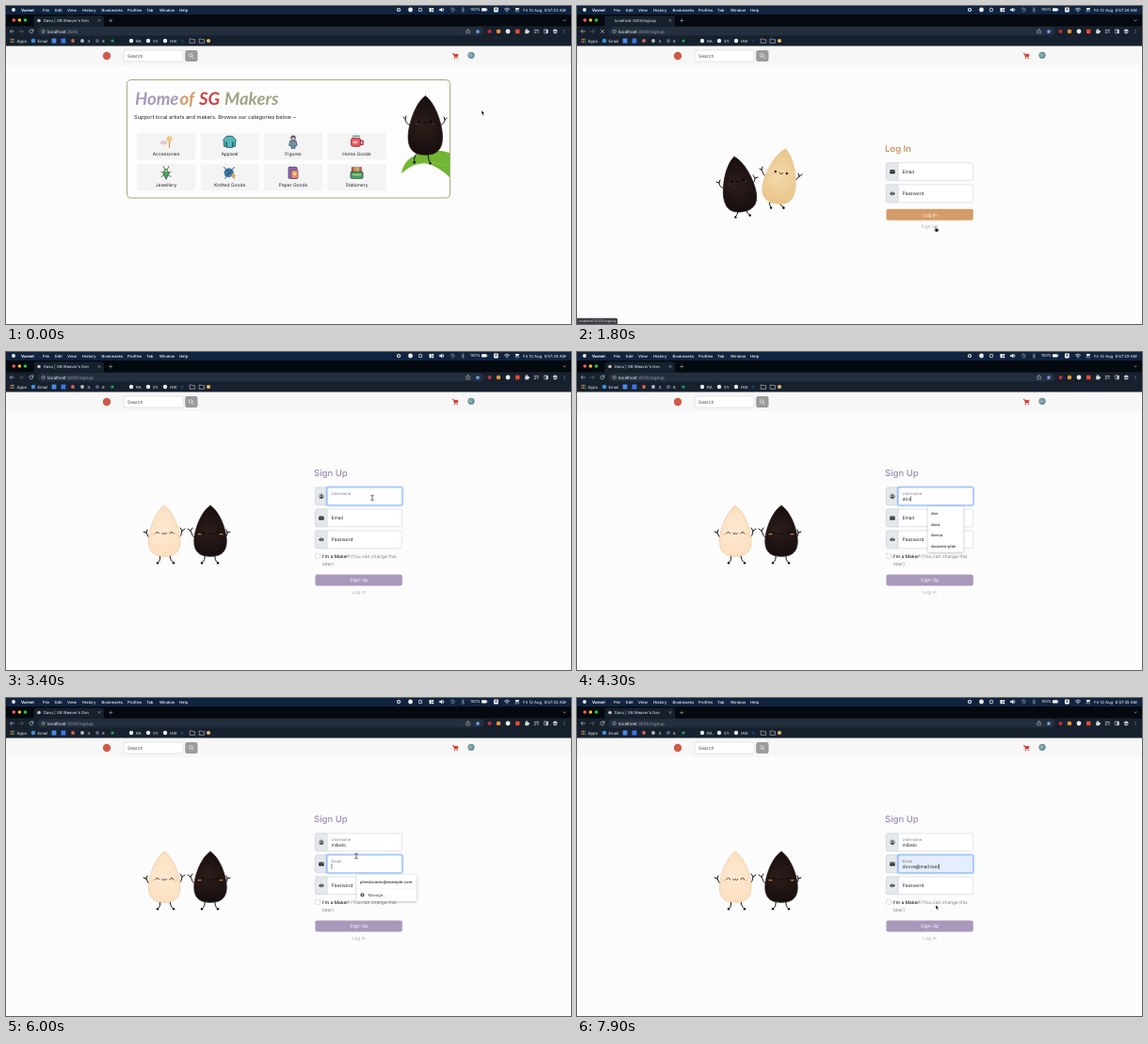
An HTML page with a canvas for the animation above (8000 ms loop, 600 by 338 pixels).

```html
<!DOCTYPE html>
<html lang="en">
<head>
<meta charset="utf-8">
<title>Shop sign up</title>
<style>
html, body { margin: 0; width: 100%; height: 100%; overflow: hidden; background: #fcfcfd; }
canvas { display: block; width: 600px; height: 338px; }
</style>
</head>
<body>
<canvas id="stage"></canvas>
<script>
const canvas = document.getElementById('stage');
const ctx = canvas.getContext('2d');
const ratio = window.devicePixelRatio || 1;
canvas.width = 600 * ratio;
canvas.height = 338 * ratio;
ctx.textRendering = 'geometricPrecision';

const LOOP = 8000, STEP = 100;
const SITE = 'Davu', TITLE = SITE + " | OB Weaver's Den";
const TAN = '#d49c68', PURPLE = '#a898bb', INK = '#212529', LINE = '#ced4da';

// Drawing helpers
function box(x, y, w, h, r, fill, stroke, width = 0.6) {
  ctx.beginPath();
  ctx.roundRect(x, y, w, h, r);
  if (fill) { ctx.fillStyle = fill; ctx.fill(); }
  if (stroke) { ctx.strokeStyle = stroke; ctx.lineWidth = width; ctx.stroke(); }
}
function dot(x, y, r, fill) {
  ctx.beginPath();
  ctx.arc(x, y, r, 0, Math.PI * 2);
  ctx.fillStyle = fill;
  ctx.fill();
}
function path(d, fill, stroke, width = 0.7) {
  const p = new Path2D(d);
  if (fill) { ctx.fillStyle = fill; ctx.fill(p); }
  if (stroke) {
    ctx.strokeStyle = stroke; ctx.lineWidth = width;
    ctx.lineCap = ctx.lineJoin = 'round';
    ctx.stroke(p);
  }
}
function text(s, x, y, size, color, weight = 400, align = 'left', family = 'Inter') {
  ctx.font = `${weight} ${size}px ${family}, sans-serif`;
  ctx.textAlign = align;
  ctx.textBaseline = 'alphabetic';
  ctx.fillStyle = color;
  ctx.fillText(s, x, y + size * 0.36);
  return ctx.measureText(s).width;
}
function at(x, y, draw, turn = 0) {
  ctx.save();
  ctx.translate(x, y);
  ctx.rotate(turn);
  draw();
  ctx.restore();
}
const latest = (events, t) => events.reduce((now, e) => e[0] <= t ? e : now, events[0]);

// Timeline
const mouse = [[0, 505, 111], [300, 494, 53], [800, 494, 54], [1100, 448, 209], [1500, 381, 235],
  [1900, 381, 235], [2500, 391, 162], [2800, 389, 155], [3700, 389, 155],
  [5300, 389, 155], [5600, 372, 168], [6600, 372, 168], [7700, 379, 204], [7900, 381, 220]];
const userTyping = [[0, ''], [3800, 'd'], [4000, 'do'], [4200, 'dov'], [4500, ''], [4700, 'm'],
  [4800, 'mi'], [5000, 'mib'], [5100, 'mibe'], [5200, 'mibel'], [5300, 'mibelo']];
const mailTyping = [[0, ''], [6600, 'd'], [6900, 'do'], [7000, 'dov'], [7100, 'dovv'],
  [7200, 'dovva'], [7700, 'dovva@mail.test']];

function mouseAt(t) {
  const i = Math.max(1, mouse.findIndex(k => k[0] >= t));
  const [t0, x0, y0] = mouse[i - 1], [t1, x1, y1] = mouse[i];
  const u = (t - t0) / (t1 - t0), e = u * u * (3 - 2 * u);
  return [x0 + (x1 - x0) * e, y0 + (y1 - y0) * e];
}

// Browser window
function menuBar(t) {
  box(0, 0, 600, 9, 0, '#10243f');
  dot(8, 4, 1.9, '#f1f3f5');
  text('Vornel', 16, 4, 4.3, '#fff', 700);
  [['File', 39], ['Edit', 52], ['View', 65], ['History', 81], ['Bookmarks', 101.5], ['Profiles', 129],
    ['Tab', 149], ['Window', 163], ['Help', 184]].forEach(([s, x]) => text(s, x, 4, 4.2, '#f1f3f5', 500));
  dot(417, 4, 2.1, '#e9edf2'); dot(417, 4, 1, '#10243f');
  dot(429.5, 4, 2.4, '#e9edf2');
  dot(440, 4, 2.2, '#bcc5d0'); dot(440, 4, 1.3, '#10243f');
  box(449.5, 2, 2.2, 4.2, 0.4, '#fff'); box(452.2, 2, 2, 1.8, 0.3, '#fff'); box(452.2, 4.4, 2, 1.8, 0.3, '#fff');
  path('M460.5 3.2h1.2l1.5-1.2v4l-1.5-1.2h-1.2zM464.5 2.5q1.5 1.5 0 3', '#fff', '#fff', 0.4);
  path('M472.3 4a2 2 0 1 1 .8 1.6M474.2 2.8v1.3l.9.5', null, '#aeb8c5', 0.5);
  path('M483.8 2.7l2.8 2.7-1.4 1.2v-5l1.4 1.2-2.8 2.7', null, '#b8c2ce', 0.45);
  text('100%', 493, 4, 4.1, '#fff');
  box(505, 2.3, 5.5, 3.3, 0.8, '#fff'); box(510.9, 3.3, 0.5, 1.3, 0.2, '#fff');
  box(518, 1.6, 4.8, 4.8, 0.8, '#fff'); text('A', 520.4, 4, 4, '#10243f', 600, 'center');
  path('M529.4 3.2q2.6-2.4 5.2 0M530.6 4.4q1.4-1.3 2.8 0', null, '#fff', 0.7); dot(532, 5.8, 0.6, '#fff');
  box(540.8, 1.9, 4.2, 1.8, 0.9, '#fff'); box(541, 4.4, 3.8, 1.6, 0.8, null, '#fff', 0.4);
  const second = Math.floor(23.45 + t * 0.0015);
  text(`Fri 12 Aug  8:57:${second} AM`, 594.5, 4, 4.25, '#fff', 400, 'right');
}

function browser(t, route, loading) {
  box(0, 8.5, 600, 14, 0, '#04090f');
  ['#ff5f57', '#febc2e', '#28c840'].forEach((c, i) => dot(8.3 + i * 6.1, 15, 1.8, c));
  const bar = '#17212e', icon = '#d4d9df';
  box(29.5, 10.5, 74.5, 13, [3, 3, 0, 0], bar);
  if (!loading) dot(35, 15.5, 1.8, '#c9c4bd');
  text(loading ? 'localhost:3000' + route : TITLE, 40, 15.5, 4.15, '#eef0f2');
  path('M98 14.4l2 2m0-2l-2 2M109.5 15.5h3.4m-1.7-1.7v3.4', null, icon, 0.45);
  path('M591.7 14.7l1.4 1.4 1.4-1.4', null, icon, 0.5);

  box(0, 21.5, 600, 21, 0, bar);
  box(33.5, 22.3, 474, 9, 4.5, '#242f3d');
  path('M8.5 27H4.4m1.7-1.8L4.3 27l1.8 1.8', null, icon, 0.6);
  path('M14 27h4.1m-1.7-1.8l1.8 1.8-1.8 1.8', null, '#68717c', 0.6);
  path(loading ? 'M25.4 25.4l3.2 3.2m0-3.2l-3.2 3.2' : 'M28.7 26a2 2 0 1 0 .1 1.7M29 24.7v1.6h-1.6', null, icon, 0.6);
  path('M41.4 27a1.8 1.8 0 1 1-3.6 0a1.8 1.8 0 1 1 3.6 0M39.6 26.9v.9M39.6 26v.1', null, icon, 0.4);
  const w = text('localhost', 44, 27, 4.6, '#fff');
  text(':3000' + route, 44 + w, 27, 4.6, '#9aa2ac');
  path('M489.5 26h-.9v3h4v-3h-.9M490.6 28v-3.6m-1 1l1-1 1 1', null, icon, 0.4);
  path('M501 24.6l.8 1.6 1.7.2-1.3 1.2.4 1.7-1.6-.9-1.6.9.4-1.7-1.3-1.2 1.7-.2z', '#78a9f7');
  dot(513.5, 27, 2, '#c62e32'); dot(523, 27, 2.3, '#e79433'); dot(533, 27, 2.4, '#e9edf1');
  box(541, 24.7, 4.5, 4.5, 0.7, '#e64b31');
  box(551.2, 25.4, 3.8, 3.8, 0.5, icon); dot(553, 25.1, 0.9, icon); dot(555.2, 27.2, 0.9, icon);
  path('M561.2 25.4h4m-4 1.6h2m-2 1.6h1.5M565 25.6v3', null, icon, 0.6);
  box(571.4, 25, 4, 4, 0.5, null, icon, 0.5); box(573.5, 25, 2, 4, 0, icon);
  dot(583.2, 27, 2.4, '#bec5cd'); box(581, 27, 4.4, 1.1, 0.2, '#4c5663');
  [25.4, 27, 28.6].forEach(y => dot(593, y, 0.45, icon));

  for (let i = 0; i < 9; i++)
    box(4.5 + i % 3 * 1.6, 34.8 + Math.floor(i / 3) * 1.6, 1.1, 1.1, 0.2, ['#e26150', '#e2b540', '#58a869'][i % 3]);
  text('Apps', 11.5, 37, 4.3, '#e8eaed');
  dot(29, 37, 2.3, '#3f8dda');
  text('Email', 33.5, 37, 4.3, '#e8eaed');
  box(48.6, 34.6, 4.8, 4.8, 0.7, '#4d89ea'); box(58.5, 34.6, 4.8, 4.8, 0.5, '#3c77e7');
  dot(71, 37, 1.9, '#d7645a'); dot(81, 37, 1.9, '#b9c0c8');
  text(':3', 85.5, 37, 4.3, '#e8eaed');
  dot(97, 37, 2, '#526575'); text('8', 102, 37, 4.3, '#e8eaed');
  dot(113, 37, 1.6, '#1fa65a');
  [['RA', 133], ['SY', 151], ['HW', 169]].forEach(([s, x]) => {
    dot(x, 37, 2.2, '#e8edf2'); text(s, x + 5, 37, 4.3, '#e8eaed');
  });
  dot(187, 37, 1.8, '#183a61');
  [195.5, 205.5].forEach(x => path(`M${x} 35h2l.6.7h2.5v3.6h-5.1z`, null, icon, 0.55));
  dot(215, 37, 2.1, '#e5b96a');
}

function navBar() {
  box(0, 42, 600, 296, 0, '#fcfcfd');
  box(0, 42, 600, 21, 0, '#f7f7f7');
  dot(107, 53, 4.2, '#d05a48');
  box(125, 47, 63, 12, 2, '#fff', LINE);
  text('Search', 129, 53, 4.95, '#444a50');
  box(190.2, 47, 13.3, 12, 2, '#9b9b9b');
  path('M198 52.4a1.8 1.8 0 1 1-3.6 0a1.8 1.8 0 1 1 3.6 0M197.6 53.8l1.7 1.8', null, '#fff', 0.6);
  path('M474.3 50.4h1l.8 3.7h3.3l.7-2.8h-4.4z', '#d33a2e', '#d33a2e', 0.6);
  dot(476.4, 55.5, 0.7, '#d33a2e'); dot(479.2, 55.5, 0.7, '#d33a2e');
  dot(494, 52.3, 3.6, '#688e93'); dot(493.4, 52, 2.2, '#86b0af');
}

// Seed mascots
function seed(x, y, w, h, turn, dark, face) {
  at(x, y, () => {
    const a = w / 2, b = h / 2;
    const shade = ctx.createRadialGradient(-a * 0.2, 0, 1, 0, 0, b);
    shade.addColorStop(0, dark ? '#2c1d1b' : face === 'happy' ? '#fee8d0' : '#f3d9aa');
    shade.addColorStop(1, dark ? '#160e0e' : face === 'happy' ? '#fbdfc0' : '#e8c487');
    path(`M0 ${-b}C${a * 0.55} ${-b * 0.8} ${a} ${-b * 0.05} ${a} ${b * 0.4}C${a} ${b * 0.9} ${a * 0.5} ${b} 0 ${b}` +
      `C${-a * 0.5} ${b} ${-a} ${b * 0.9} ${-a} ${b * 0.4}C${-a} ${-b * 0.05} ${-a * 0.55} ${-b * 0.8} 0 ${-b}Z`,
      shade, dark ? '#2b1d1b' : '#ebc795', 0.7);
    const ink = dark ? '#050303' : '#261b18';
    if (face === 'happy') {
      path('M-9.6 2.6q2-3.4 4 0M5.6 2.6q2-3.4 4 0M-2.6 2.2q1.3 2.4 2.6 0q1.3 2.4 2.6 0', null, ink, 0.8);
      [-11.5, 11.5].forEach(c => box(c - 2, 2.8, 4, 1.2, 0.6, dark ? '#ce7b4d' : '#f7c49d'));
    } else {
      dot(-6.5, -4, 1.2, ink); dot(5.7, -4, 1.2, ink);
      path('M-2.2-3.4q1.8 2.3 3.6 0', null, ink, 0.9);
      [-9, 8.4].forEach(c => box(c - 1.5, -2.2, 3, 1.1, 0.5, dark ? '#51302b' : '#edb47f'));
    }
  }, turn);
}
const limbs = d => path(d, null, '#191211', 1);
const hands = points => points.forEach(([x, y]) => dot(x, y, 1.2, '#191211'));

// Pages
const categories = [
  ['Accessories', () => { box(-6, -1, 7, 4, 2, '#dfc9cc'); dot(3.5, -3, 3, '#f0c980'); path('M3.5 0v6', null, '#d39b62', 1.2); }],
  ['Apparel', () => path('M-3-6h6l3.5 4-.7 7h-2.5v-5v6h-6.6v-6v5h-2.5l-.7-7z', '#53b9b7', '#26536a', 0.9)],
  ['Figures', () => { path('M-3-1h6l1 5h-2v3h-4v-3h-2z', '#7191a8', '#374a62', 0.8); dot(0, -4, 2.7, '#465267'); dot(0, -3.4, 1.7, '#e6b39a'); }],
  ['Home Goods', () => { path('M3.5-1h3v4h-3', null, '#b8384b', 1.5); box(-6, -4, 10, 9, 2, '#ea5260', '#823345', 0.8); box(-4, -1, 5, 3, 1, '#f4b9ac'); path('M-4-6h7', null, '#69a4a5', 1.5); }],
  ['Jewellery', () => { path('M-3-7l2 4m4-4l-2 4M-5-1l10 5M5-1l-10 5', null, '#35543b', 0.8); path('M0-4l3 4-3 7-3-7z', '#49a660', '#274b36', 0.8); dot(0, -2, 1.4, '#95d074'); }],
  ['Knitted Goods', () => { dot(-1, 0, 5, '#3f88b7'); path('M-5 0q4-5 7-3M-4 3q5-6 8-4M-6-6L5 6M5-6L-5 6', null, '#274a72', 0.9); dot(4, 3, 2, '#e4aa43'); }],
  ['Paper Goods', () => { box(-5, -6, 9, 12, 1, '#8b6bb0', '#4a3b70', 0.8); box(-2, -3, 7, 9, 0.8, '#eb8f79', '#724057', 0.7); dot(1.5, 1, 1.7, '#f5d57d'); }],
  ['Stationery', () => { ['#d94b45', '#efaa43', '#efcf50', '#d95553'].forEach((c, i) => box(-5.5 + i * 2.8, -6, 2.3, 7, 0.7, c, '#59433c', 0.4)); box(-6.5, -1, 13, 7, 1, '#4ca264', '#284e3f', 0.8); path('M-4 2h8', null, '#d6e5a1', 1); }]
];

function homePage() {
  box(128.5, 78.5, 343, 125.5, 4, '#fdfdfd', '#9fac80', 1);
  [['Home', 137, PURPLE], ['of', 184.5, TAN], ['SG', 205, '#c64541'], ['Makers', 232, '#9ba681']]
    .forEach(([s, x, c]) => text(s, x, 98, 18.5, c, 'italic 700', 'left', 'Lato'));
  text('Support local artists and makers. Browse our categories below ~', 136, 118, 5.65, INK);
  categories.forEach(([label, draw], i) => {
    const x = 139 + i % 4 * 67.5, y = i < 4 ? 135 : 168;
    box(x, y, 62.3, 28.3, 2, '#f4f4f5');
    at(x + 31, y + 9.3, draw);
    text(label, x + 31, y + 21.8, 4.95, INK, 400, 'center');
  });
  path('M420 178Q422 164 436 158Q455 150 471 156V182Q463 174 452 169Q437 163 420 178Z', '#72b532');
  path('M421 177Q436 160 471 170', null, '#93c95a', 0.7);
  limbs('M430 127Q424 125 424 120l-2-2m2 2l1-3M460 127Q466 125 466 121l2-2m-2 2l-1-3M437 156Q432 161 434 166M448 156Q448 164 451 167');
  hands([[433.6, 166.3], [450.5, 167.3]]);
  seed(445.3, 127, 36.5, 62.5, 0, true, 'calm');
}

function field(y, label, glyph, value, focused, caret, fill = '#fff') {
  box(328.4, y, 92.2, 18.7, 2, fill, LINE);
  box(328.4, y, 12.8, 18.7, [2, 0, 0, 2], '#e4e8ec', LINE);
  const m = y + 9.4;
  if (glyph === 'mail') {
    box(332.2, m - 2, 5.4, 4.2, 0.7, INK); path(`M332.7 ${m - 1.2}l2.2 1.5 2.2-1.5`, null, '#e4e8ec', 0.5);
  } else if (glyph === 'eye') {
    path(`M332 ${m}q2.9-3.6 5.8 0q-2.9 3.6-5.8 0`, INK); dot(334.9, m, 1.2, '#e4e8ec'); dot(334.9, m, 0.7, INK);
  } else {
    path(`M337.3 ${m}a2.4 2.4 0 1 1-4.8 0a2.4 2.4 0 1 1 4.8 0`, null, INK, 0.5);
    dot(334.9, m - 0.7, 0.9, INK); path(`M333.3 ${m + 1.5}q1.6-2.2 3.2 0z`, INK, INK, 0.3);
  }
  if (focused) {
    box(340.7, y - 0.4, 80.4, 19.5, 2, null, 'rgba(13,110,253,.25)', 2.2);
    box(341.2, y, 79.4, 18.7, 1, fill, '#86b7fe', 0.7);
  }
  if (!focused && !value) return text(label, 345.5, m, 4.95, INK);
  text(label, 345.5, y + 6.1, 4.25, '#777d83');
  const w = text(value, 345.5, y + 12.1, 4.95, INK);
  if (caret) box(345.7 + w, y + 9.3, 0.5, 5.4, 0, '#111');
}
function button(label, y, color) {
  box(328.4, y, 92.4, 12, 2, color);
  text(label, 374.6, y + 6, 5.1, '#fff', 400, 'center');
}
const blink = (t, since) => (t - since) % 700 < 350;

function loginPage(t) {
  limbs('M157 194Q151 193 151 188l-3-1m3 1l1-3M184 190Q189 188 189 183l3-1m-3 1l-2-3M170 216Q172 222 168 224M180 216Q180 221 184 222');
  limbs('M201 182Q198 180 196 174l-2-1m2 1l1-3M229 186Q233 186 236 181l3-2m-3 2l-1-3M205 207Q203 211 206 214M216 208Q215 213 220 214');
  hands([[168.4, 224.6], [183.6, 222.6], [206, 214.6], [219.4, 214.8]]);
  seed(171.3, 189.5, 35, 59, -0.15, true, 'calm');
  seed(216.5, 181, 35, 59, 0.17, false, 'calm');
  text('Log In', 327, 151.3, 9.5, '#cd995f', 600);
  const focused = t < 1600;
  field(190, 'Password', 'eye', '');
  field(166.6, 'Email', 'mail', '', focused, focused && blink(t, 700));
  button('Log In', 215.7, TAN);
  text('Sign Up', 374.5, 234, 4.95, '#a9a9ad', 400, 'center');
}

function popup(x, y, w, h) {
  ctx.save();
  ctx.shadowColor = 'rgba(0,0,0,.28)';
  ctx.shadowBlur = 3 * ratio;
  ctx.shadowOffsetY = ratio * 0.7;
  box(x, y, w, h, 1, '#fff');
  ctx.restore();
}

function signupPage(t) {
  limbs('M154 198Q150 197 149 192l-3-1m3 1l1-3M183 198Q187 195 187 190l3-2m-3 2l-2-3M163 215Q165 222 161 224M174 215Q174 222 178 224');
  limbs('M201 198Q197 195 196 190l-3-2m3 2l2-3M231 198Q235 197 235 192l3-1m-3 1l-1-3M211 215Q212 222 208 224M222 215Q221 222 225 224');
  hands([[161, 224.3], [178, 224.3], [208, 224.3], [225, 224.3]]);
  seed(168.2, 190.3, 33.5, 54, 0, false, 'happy');
  seed(217, 190.3, 34.5, 54, 0, true, 'happy');
  text('Sign Up', 327, 128.6, 9.5, '#9c8bb4', 500);

  const [userSince, user] = latest(userTyping, t), [mailSince, mail] = latest(mailTyping, t);
  const onUser = t >= 2900 && t < 5700, onMail = t >= 5700;
  field(190, 'Password', 'eye', '');
  field(144, 'Username', 'person', user, onUser, onUser && blink(t, Math.max(2900, userSince)));
  field(167, 'Email', 'mail', mail, onMail, onMail && blink(t, Math.max(5700, mailSince)),
    t >= 7700 ? '#e5eefb' : '#fff');

  box(328.5, 214.3, 5, 5, 1, '#fff', '#bfc3c8', 0.5);
  const w = text("I'm a Maker! ", 336, 217, 4.9, INK, 500);
  text('(You can change this', 336 + w, 217, 4.9, '#7c8187');
  text('later)', 336, 225, 4.9, '#7c8187');
  button('Sign Up', 236.5, PURPLE);
  text('Log in', 374.5, 255, 4.95, '#a9a9ad', 400, 'center');

  if (onUser && user.startsWith('d')) {
    popup(372.7, 164.3, 37.5, 48.5);
    ['dov', 'dovs', 'dovva', 'dovaren-plim'].forEach((s, i) => text(s, 376, 172 + i * 11.4, 4.15, INK, 500));
  } else if (t >= 5900 && t < 6600) {
    popup(372.3, 188, 63.5, 28);
    text('plimdovaren@example.com', 376, 195.5, 4.15, INK, 500);
    box(372.3, 202.4, 63.5, 0.4, 0, '#dfe1e4');
    dot(378.4, 209.3, 2, '#4a4e54'); dot(378.4, 209.3, 0.8, '#fff');
    text('Manage...', 384.5, 209.3, 4.15, '#444');
  } else if (t >= 6600 && t < 7700) {
    popup(372.3, 188, 63.5, 16);
    text('dovva@mail.test', 376, 195.8, 4.15, INK, 500);
  }
}

function statusBubble(route, alpha) {
  ctx.globalAlpha = alpha;
  box(0, 331.8, route === '/login' ? 40 : 43, 6.2, [0, 1.5, 0, 0], '#3a3e43');
  text('localhost:3000' + route, 1.5, 335, 3.8, '#c9cdd2');
  ctx.globalAlpha = 1;
}

function pointer(t) {
  if ((t >= 3800 && t < 5400) || (t >= 6600 && t < 7800)) return;
  const [x, y] = mouseAt(t);
  const hand = (t >= 300 && t < 900) || (t >= 1500 && t < 1900);
  const beam = (t >= 2300 && t < 3800) || (t >= 5400 && t < 6600);
  at(x, y, () => {
    if (beam) path('M-1.3-2.8q1.3 0 1.3.8v4q0 .8-1.3.8M1.3-2.8q-1.3 0-1.3.8m0 4q0 .8 1.3.8', null, '#222', 0.65);
    else if (hand) path('M-.6-.5q.8-.8 1 .4v1.5l1.8.4q1 .3.7 1.6l-.5 1.5h-2.6l-1.6-2.2q.2-.8 1.2 0z', '#111', '#fff', 0.4);
    else path('M0 0v4.5l1-.9.8 1.8.9-.4-.8-1.7h1.4z', '#111', '#fff', 0.35);
  });
}

function render(t) {
  ctx.setTransform(ratio, 0, 0, ratio, 0, 0);
  const route = t < 600 ? '' : t < 1700 ? '/login' : '/signup';
  const loading = (t >= 600 && t < 800) || (t >= 1700 && t < 2000);
  navBar();
  if (t < 800) homePage();
  else if (t < 1900) loginPage(t);
  else signupPage(t);
  browser(t, route, loading);
  menuBar(t);
  if (t >= 400 && t < 1200) statusBubble('/login', t < 1000 ? 1 : 0.45);
  if (t >= 1500 && t < 2100) statusBubble('/signup', t < 2000 ? 1 : 0.45);
  pointer(t);
}

const start = performance.now();
function tick() {
  const t = (performance.now() - start) % LOOP;
  render(Math.floor(t / STEP) * STEP);
  requestAnimationFrame(tick);
}
tick();
</script>
</body>
</html>
```
